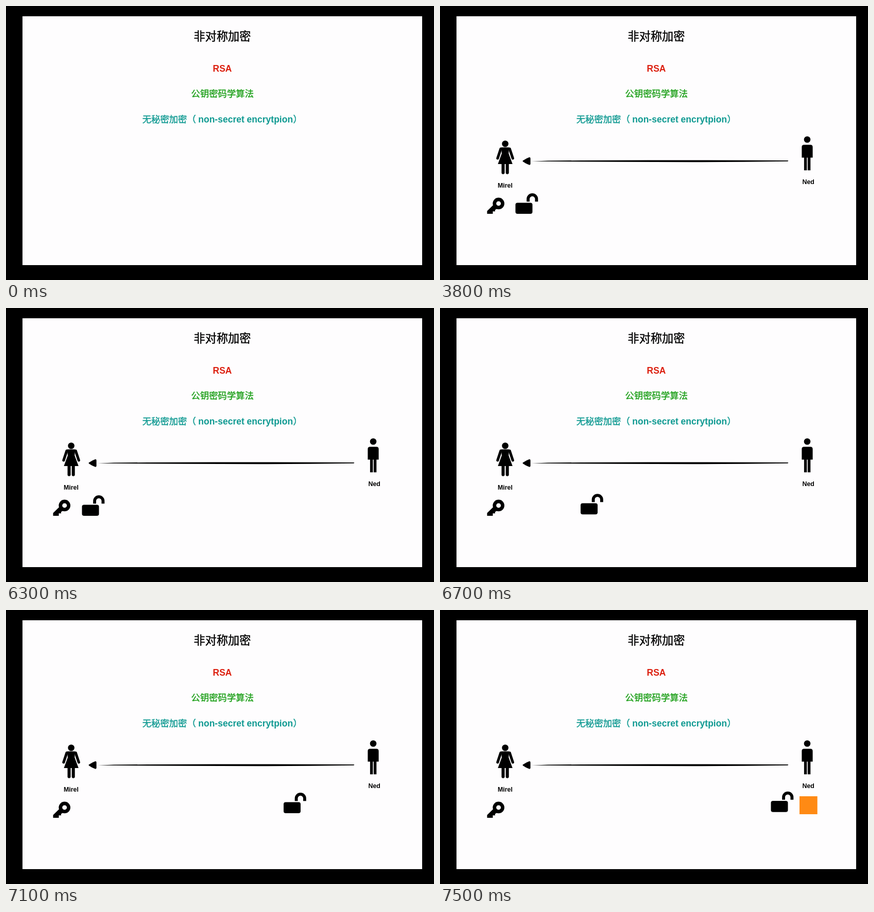
Animation of 831x534 px, one loop 8 s. Source, as an HTML page:

```html
<!DOCTYPE html>
<html lang="zh">
<head>
<meta charset="utf-8">
<title>非对称加密</title>
<style>
  html, body { margin: 0; width: 100%; height: 100%; overflow: hidden; background: #000; }
  svg { display: block; width: 100%; height: 100%; }
  text { font: bold 17.5px "Liberation Sans", sans-serif; white-space: pre; }
  .zh { font: 400 17.35px "Noto Sans CJK SC", "Noto Sans CJK", sans-serif; stroke: currentColor; stroke-width: .4px; }
  .title { font-size: 22.2px; }
  .name { font-size: 12.4px; }
  .mid { text-anchor: middle; }
  .red { fill: #dc2010; }
  .green { fill: #1ea01a; color: #1ea01a; }
  .teal { fill: #109a92; color: #109a92; }
  .line { fill: none; stroke: #000; }
</style>
</head>
<body>
<svg viewBox="0 0 831 534">
  <rect width="831" height="534"/>
  <rect x="32" y="20" width="776" height="485" fill="#fefdfe"/>

  <text class="zh title mid" x="420" y="67.4">非对称加密</text>
  <text class="red mid" x="420" y="128">RSA</text>
  <text class="zh green mid" x="420.3" y="176.5">公钥密码学算法</text>
  <g class="teal">
    <text class="zh" x="264.7" y="227.4">无秘密加密（</text>
    <text x="373.3" y="227">non-secret encrytpion</text>
    <text class="zh" x="557.5" y="227.4">）</text>
  </g>

  <g id="people">
    <circle cx="126.6" cy="268.5" r="6.3"/>
    <path d="M119 275.5H134L133.3 287.5L140.8 308H112.4L119.9 287.5Z"/>
    <path class="line" stroke-width="5.2" stroke-linecap="round" d="M118 278.3L111.9 296.8M135.2 278.3L141.3 296.8"/>
    <path class="line" stroke-width="6" stroke-linecap="round" d="M122.5 307V324.8M130.7 307V324.8"/>
    <text class="name mid" x="126.5" y="354">Mirel</text>

    <circle cx="713" cy="260.2" r="6.3"/>
    <path d="M706.5 270.5H719.5Q723.6 270.5 723.6 275V295.5H702.4V275Q702.4 270.5 706.5 270.5Z"/>
    <path d="M706.9 295H712.3V320.3H706.9ZM713.9 295H719.3V320.3H713.9Z"/>
    <text class="name mid" x="715.2" y="346.5">Ned</text>

    <path d="M161 301.2Q167 297 173.5 294.8Q175.5 294.6 175.6 297V307.5Q175.5 310.2 173.5 309.8Q167 307.5 161 303.2Q159.800 302.200 161 301.200Z"/>
    <path d="M178 302.700L210 301.500Q345 300.300 430 300.500Q580 300.100 675 301Q677.500 301.700 675 302.700Q580 304.100 490 304.200L345 303.700L210 303.100Z"/>
  </g>

  <g id="key">
    <circle class="line" cx="113.7" cy="384.9" r="7.9" stroke-width="6.8"/>
    <path d="M91.500 399.500L104 387.300L111 394.500L107 397.500V400.300H102.500V404.900H91.500Z"/>
  </g>

  <g id="lock">
    <rect x="146.500" y="383.500" width="33" height="21.600" rx="4"/>
    <path class="line" stroke-width="5.800" d="M171.100 381.200V376.100A8.150 8.150 0 0 1 187.400 376.100V381.200"/>
  </g>

  <rect id="box" x="698" y="363" width="34.700" height="35" fill="#ff8a14"/>
</svg>
<script>
  const LOOP = 8000, STEP = 100, MOVE_START = 6300;
  const appear = { people: 700, key: 3800, lock: 3800, box: 7500 };

  // Horizontal travel of the lock at each step, easing in and out.
  const travel = [1, 10, 34, 73, 126.5, 193, 263, 331, 392.5, 439, 471, 490, 496];
  const RISE = -11.4 / 496;

  const byId = id => document.getElementById(id);
  const lock = byId('lock');

  function draw(t) {
    for (const id in appear) {
      byId(id).setAttribute('visibility', t >= appear[id] ? 'visible' : 'hidden');
    }
    const i = Math.floor((t - MOVE_START) / STEP);
    const x = i < 0 ? 0 : travel[Math.min(i, travel.length - 1)];
    lock.setAttribute('transform', `translate(${x} ${x * RISE})`);
  }

  const start = performance.now();
  function tick() {
    draw((performance.now() - start) % LOOP);
    requestAnimationFrame(tick);
  }
  tick();
</script>
</body>
</html>
```
